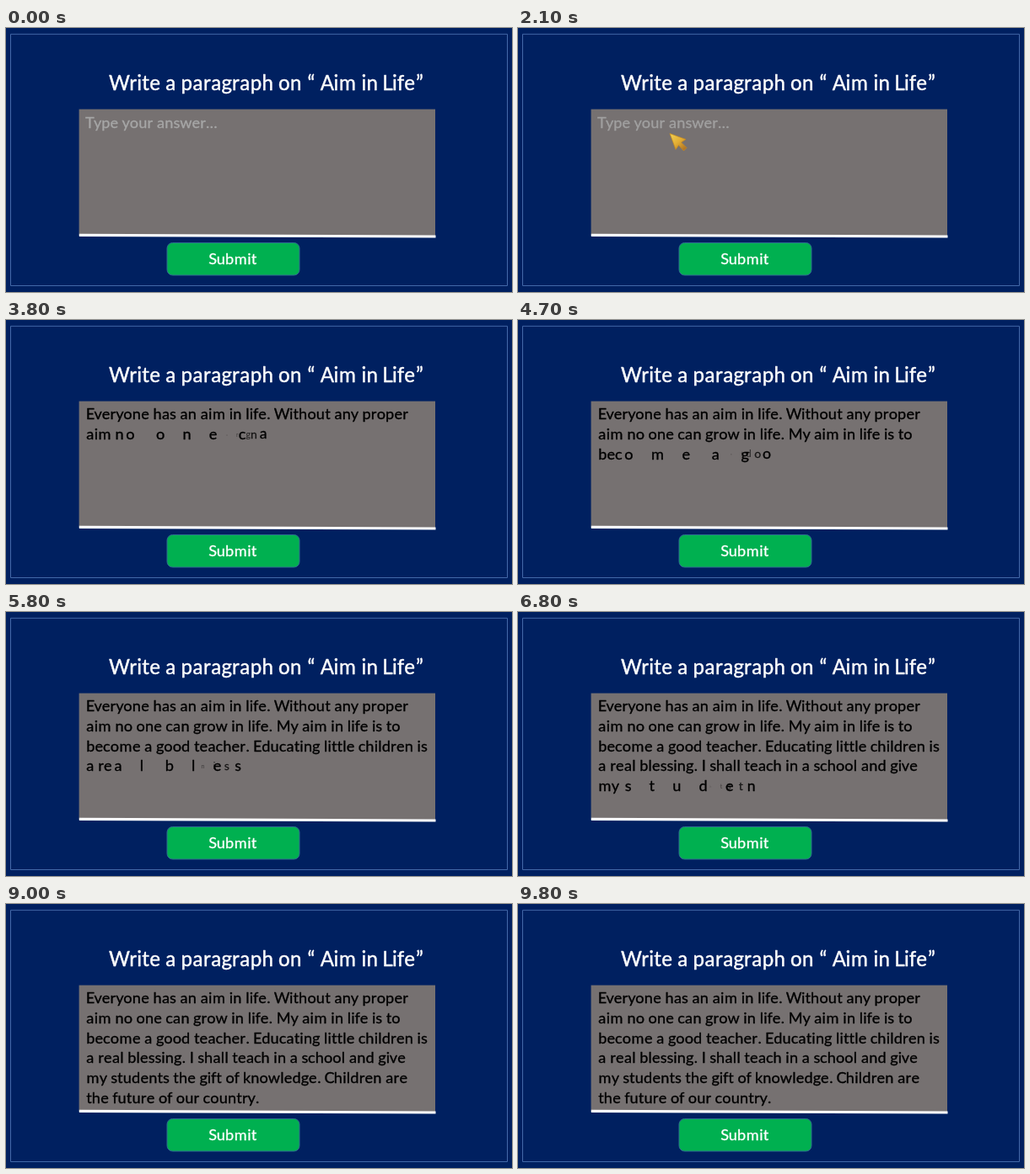
Recreate the animation shown at these times as an HTML page with a canvas. Size 600x314 px, loop 10 s.

```html
<!DOCTYPE html>
<html lang="en">
<head>
<meta charset="utf-8">
<title>Aim in Life</title>
<style>
  html, body { margin: 0; width: 100%; height: 100%; overflow: hidden; background: #002060; }
  canvas { display: block; }
</style>
</head>
<body>
<canvas id="stage" width="600" height="314"></canvas>
<script>
const ctx = document.getElementById('stage').getContext('2d');

const LOOP = 10000, TICK = 100;
const SIZE = 19.72, TITLE_SIZE = 26.2;
const LEFT = 95.1, FIRST_LINE = 117.7, LINE_STEP = 23.9;

// Letter flight: out to the right while growing, then back into place.
const FIRST_LETTER = 2478, LETTER_GAP = 25, HALF = 125, REACH = 105;

const LINES = [
  'Everyone has an aim in life. Without any proper',
  'aim no one can grow in life. My aim in life is to',
  'become a good teacher. Educating little children is',
  'a real blessing. I shall teach in a school and give',
  'my students the gift of knowledge. Children are',
  'the future of our country.'
];

// Advance per character in thousandths of the type size.
const ADVANCE = {
  226: ' ', 229: 'il', 252: '.I', 305: 'f', 335: 't', 349: 'r', 391: 's',
  418: '“”', 420: 'L', 423: 'c', 453: 'vy', 455: 'k', 459: 'S', 471: 'g',
  479: 'a', 487: 'T', 488: 'E', 498: 'e', 525: 'bdhnpu', 527: 'o',
  533: 'C', 579: 'A', 690: '…', 715: 'w', 799: 'm', 855: 'M', 890: 'W'
};
const advance = {};
for (const [w, chars] of Object.entries(ADVANCE))
  for (const c of chars) advance[c] = w / 1000;

const clamp = v => Math.max(0, Math.min(1, v));

function layout(text, x, y, size) {
  const glyphs = [];
  for (const c of text) {
    const w = advance[c] * size;
    if (c !== ' ') glyphs.push({ c, x: x + w / 2, y });
    x += w;
  }
  return glyphs;
}

const title = layout('Write a paragraph on “ Aim in Life”', 122.8, 74, TITLE_SIZE);
const hint = layout('Type your answer…', 94.6, 118.5, SIZE);
const submit = layout('Submit', 240.6, 281, SIZE);
const answer = LINES.flatMap((s, i) => layout(s, LEFT, FIRST_LINE + i * LINE_STEP, SIZE));

function style(size, color) {
  ctx.font = `${size * 0.92}px Lato, "Open Sans", sans-serif`;
  ctx.textAlign = 'center';
  ctx.lineJoin = 'round';
  ctx.lineWidth = size / 60;
  ctx.fillStyle = ctx.strokeStyle = color;
}

// A hairline around each glyph gives the slightly heavier weight.
function glyph(c, x, y) {
  ctx.fillText(c, x, y);
  ctx.strokeText(c, x, y);
}

function print(glyphs, size, color) {
  style(size, color);
  for (const g of glyphs) glyph(g.c, g.x, g.y);
}

function polygon(points) {
  ctx.beginPath();
  points.forEach(([x, y]) => ctx.lineTo(x, y));
  ctx.closePath();
}

function drawPanel() {
  ctx.fillStyle = '#002060';
  ctx.fillRect(0, 0, 600, 314);
  ctx.strokeStyle = '#4468a8';
  ctx.lineWidth = 1;
  ctx.strokeRect(5.5, 7.3, 589, 299.2);

  ctx.fillStyle = '#767171';
  ctx.fillRect(86.6, 96.6, 422.4, 150.4);
  ctx.strokeStyle = '#fff';
  ctx.lineWidth = 3.2;
  ctx.beginPath();
  ctx.moveTo(86.8, 246.4);
  ctx.lineTo(509.5, 248);
  ctx.stroke();

  ctx.beginPath();
  ctx.roundRect(191, 255.5, 157, 38.5, 6.5);
  ctx.fillStyle = '#00b050';
  ctx.fill();
  ctx.strokeStyle = '#2f6f8f';
  ctx.lineWidth = 1;
  ctx.stroke();

  print(title, TITLE_SIZE, '#fff');
  print(submit, SIZE, '#fff');
}

function drawCursor(x, y) {
  ctx.save();
  ctx.translate(x, y);
  const gold = ctx.createLinearGradient(2, 2, 17, 19);
  gold.addColorStop(0, '#ffd84a');
  gold.addColorStop(0.5, '#f0b52c');
  gold.addColorStop(1, '#b8741a');
  polygon([[0, 0], [19, 7], [13.5, 10.5], [20, 17], [16.5, 20.5], [10.5, 14], [7, 19]]);
  ctx.fillStyle = gold;
  ctx.fill();
  ctx.strokeStyle = '#c98a1c';
  ctx.lineWidth = 0.8;
  ctx.stroke();
  ctx.restore();
}

function drawAnswer(t) {
  style(SIZE, '#000');
  answer.forEach((g, i) => {
    const age = t - FIRST_LETTER - i * LETTER_GAP;
    if (age <= 0) return;
    const grow = clamp(age / HALF);
    const shift = REACH * clamp(1 - Math.abs(age - HALF) / HALF);
    const mid = g.y - 4.9;
    ctx.save();
    ctx.globalAlpha = grow;
    ctx.translate(g.x + shift, mid);
    ctx.scale(grow, grow);
    glyph(g.c, 0, g.y - mid);
    ctx.restore();
  });
}

function draw(t) {
  drawPanel();
  const shown = 1 - clamp((t - 2050) / 430);
  if (shown > 0) {
    ctx.globalAlpha = shown;
    print(hint, SIZE, '#a6a6a6');
    if (t > 850) drawCursor(-22 + 202 * clamp((t - 850) / 500), 125.5);
    ctx.globalAlpha = 1;
  }
  drawAnswer(t);
}

const start = performance.now();
function frame() {
  const t = (performance.now() - start) % LOOP;
  draw(Math.floor(t / TICK) * TICK);
  requestAnimationFrame(frame);
}
frame();
</script>
</body>
</html>
```
